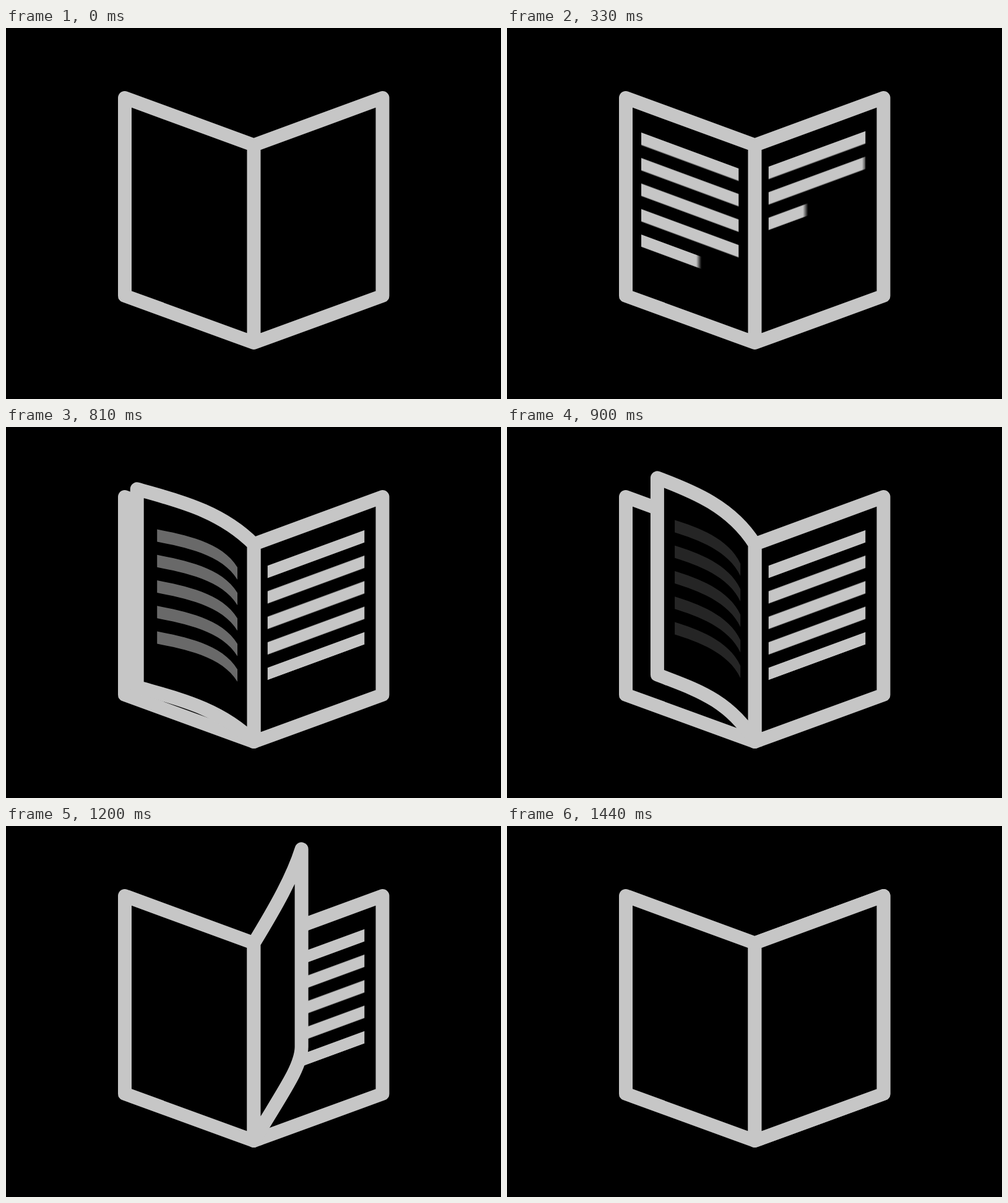
Animation, 800 px wide and 600 px high, one loop 1.77 s. Source, as an HTML page without scripts:

```html
<!DOCTYPE html>
<html lang="en">
<head>
<meta charset="utf-8">
<title>Turning page</title>
<style>
html, body { margin: 0; width: 100%; height: 100%; overflow: hidden; background: #000; }
svg { display: block; width: 800px; height: 600px; }

.outline { fill: #000; stroke: #c6c6c6; stroke-width: 22; stroke-linejoin: round; }
.curved { fill: #c6c6c6; }

/* Lines are written one after another, the right page joining in later. */
.lines rect {
  x: -165px; y: calc(var(--n) * 41.25px); width: 165px; height: 20px;
  fill: url(#ink);
  animation: write 1770ms linear calc(var(--start) + var(--n) * 60ms) infinite both;
}
.left { --start: 30ms; animation: leave 1770ms step-end infinite; }
.right { --start: 171ms; }
.lines :nth-child(1), .curved :nth-child(1) { --n: 0; }
.lines :nth-child(2), .curved :nth-child(2) { --n: 1; }
.lines :nth-child(3), .curved :nth-child(3) { --n: 2; }
.lines :nth-child(4), .curved :nth-child(4) { --n: 3; }
.lines :nth-child(5), .curved :nth-child(5) { --n: 4; }

.page { animation: enter 1770ms step-end infinite; }
.page .outline { animation: turn 1770ms linear infinite; }
.curved { animation: fade 1770ms linear infinite; }
.curved path {
  transform: translateY(calc(var(--n) * 41.25px));
  animation: bend 1770ms linear infinite;
}

@keyframes write {
  0% { transform: translateX(0); }
  5.85%, 75% { transform: translateX(165px); }
  75.01%, 100% { transform: translateX(0); }
}
@keyframes leave { 0% { visibility: visible; } 30.508%, 100% { visibility: hidden; } }
@keyframes enter { 0% { visibility: hidden; } 30.508%, 100% { visibility: visible; } }
@keyframes fade { 0%, 39% { opacity: 1; } 53.7%, 100% { opacity: 0; } }

@keyframes turn {
  0%, 30.508% {
    d: path("M400.5 189.5C331 164 261.5 138.5 192 113L192 433C261.5 458.3 331 483.7 400.5 509Z");
    animation-timing-function: cubic-bezier(.375, 0, .703, 0);
  }
  45.763% {
    d: path("M400.5 189.5C345 134 275 119 211.5 100.5L211.5 420.5C275 439 345 454 400.5 509Z");
    animation-timing-function: cubic-bezier(.36, .149, .686, .438);
  }
  57.627% {
    d: path("M400.5 189.5C412 118 378 66 328.5 33L328.5 346C368 380 396 398 400.5 509Z");
    animation-timing-function: cubic-bezier(.333, .284, .667, .617);
  }
  61.017% {
    d: path("M400.5 189.5C400.5 120 400.5 50 400.5 -8L400.5 312C400.5 370 400.5 430 400.5 509Z");
  }
  67.797% {
    d: path("M400.5 189.5C437 129 463 82 477 37L477 357C477 390 447 430 400.5 509Z");
    animation-timing-function: cubic-bezier(.3, .35, .7, .85);
  }
  81.356%, 100% {
    d: path("M400.5 189.5C469.8 164 539.2 138.5 608.5 113L608.5 433C539.2 458.3 469.8 483.7 400.5 509Z");
  }
}

@keyframes bend {
  0%, 30.508% {
    d: path("M217 169C269 188.2 322 207.5 374 227L374 247C322 227.5 269 208.2 217 189Z");
    animation-timing-function: cubic-bezier(.375, 0, .703, 0);
  }
  45.763% {
    d: path("M244 165.5C287 174 350 186 374 227L374 247C350 206 287 194 244 185.5Z");
    animation-timing-function: cubic-bezier(.36, .149, .686, .438);
  }
  57.627%, 100% {
    d: path("M345 110C366 130 382 165 386 205L386 225C382 185 366 150 345 130Z");
  }
}
</style>
</head>
<body>
<svg viewBox="0 0 800 600">
  <defs>
    <linearGradient id="ink">
      <stop offset=".95" stop-color="#c6c6c6"/>
      <stop offset="1" stop-color="#c6c6c6" stop-opacity="0"/>
    </linearGradient>
    <clipPath id="column"><path d="M0 0h156.7v190H0z"/></clipPath>
  </defs>

  <path class="outline" d="M400.5 189.5L192 113V433L400.5 509L608.5 433V113ZV509"/>

  <g class="lines left" transform="translate(217 169) skewY(20.28)" clip-path="url(#column)">
    <rect/><rect/><rect/><rect/><rect/>
  </g>
  <g class="lines right" transform="translate(422.8 224.3) skewY(-20.2)" clip-path="url(#column)">
    <rect/><rect/><rect/><rect/><rect/>
  </g>

  <g class="page">
    <path class="outline"/>
    <g class="curved"><path/><path/><path/><path/><path/></g>
  </g>
</svg>
</body>
</html>
```
